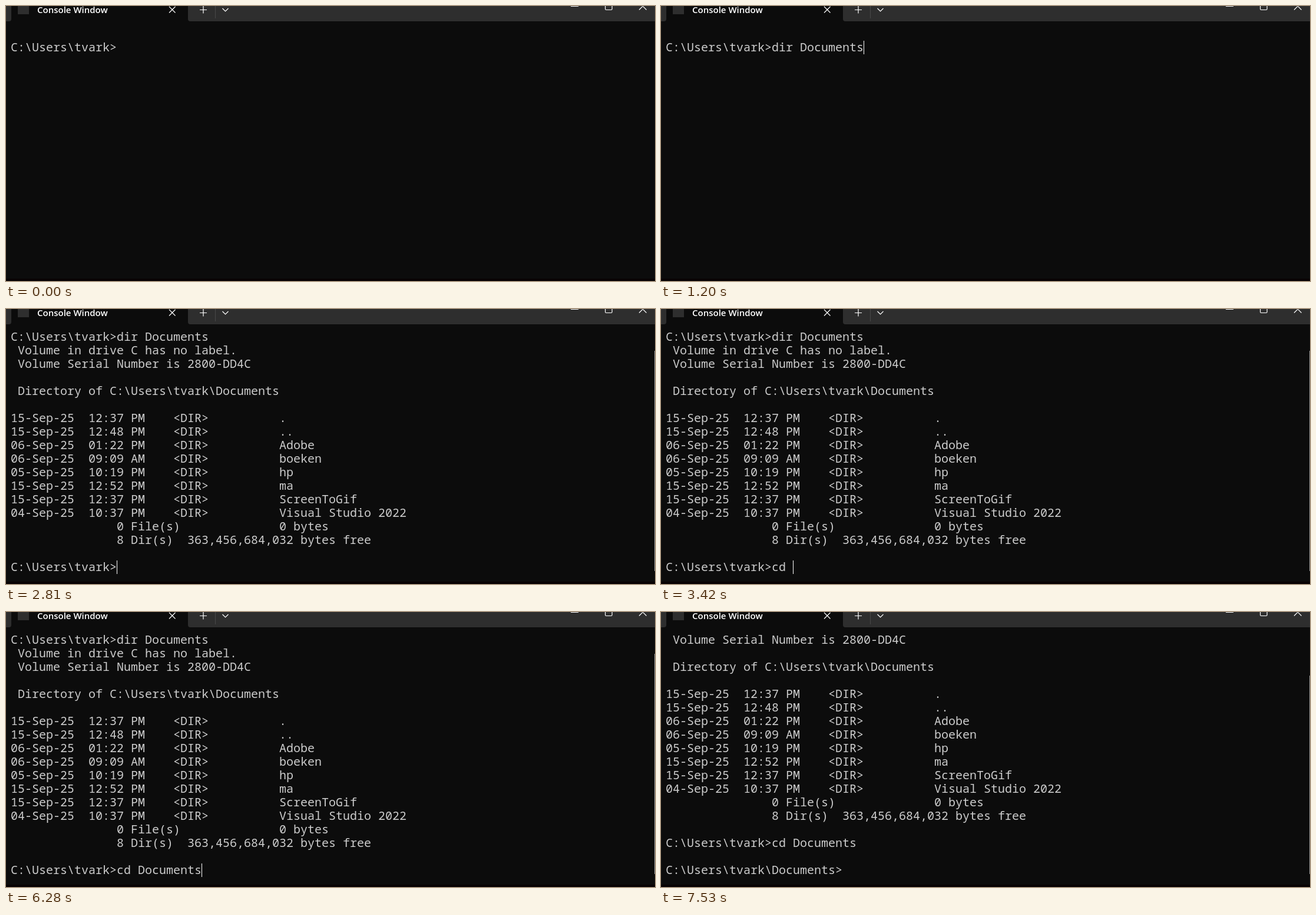
Write an HTML page that moves like this. It is 1102 px wide and 467 px high and loops after 8000 ms.

```html
<!DOCTYPE html>
<html lang="en">
<head>
<meta charset="utf-8">
<title>Console session</title>
<style>
  html, body { margin: 0; width: 100%; height: 100%; overflow: hidden; background: #0c0c0c; }
  #stage { position: relative; width: 1102px; height: 467px; overflow: hidden; background: #0c0c0c; }
  #stage > * { position: absolute; }
  #chrome { left: 0; top: 0; }
  #title {
    left: 53px; top: -4px; line-height: 20px; white-space: pre;
    font: 600 15px/20px "Open Sans", "Noto Sans", sans-serif; color: #fff;
  }
  #screen {
    left: 8px; top: 35px; margin: 0; color: #ccc;
    font: 20px/23px "Noto Sans Mono", "DejaVu Sans Mono", monospace;
    font-variant-ligatures: none;
  }
  #cursor { width: 1px; height: 23px; background: #fff; }
  #bar { left: 1101px; width: 1px; background: #9a9a9a; }
  #edge { left: 0; top: 463px; width: 1102px; height: 4px; background: #080304; }
</style>
</head>
<body>
<div id="stage">
  <svg id="chrome" width="1102" height="30" fill="none" stroke="#fff" stroke-width="1.2">
    <g fill="#2e2e2e" stroke="none">
      <path d="M0 0H9V22Q9 26 5 26H0Z"/>
      <path d="M309 0H1102V26H313Q309 26 309 22Z"/>
      <rect x="20" y="-5" width="19" height="19"/>
    </g>
    <path d="M355.5 0V21" stroke="#484848" stroke-width="1"/>
    <path d="M277 1L287.5 11.5M287.5 1L277 11.5"/>
    <path d="M329 6.5H341M335 0V12.5"/>
    <path d="M367.5 4L372.5 9L377.5 4"/>
    <path d="M959 .5H972" stroke-width="1"/>
    <rect x="1017.6" y="-5.5" width="11.5" height="12" rx="1.5"/>
    <path d="M1075 6.5L1087.5 -6M1087.5 6.5L1075 -6"/>
  </svg>
  <div id="title">Console Window</div>
  <pre id="screen"></pre>
  <div id="cursor"></div>
  <div id="bar"></div>
  <div id="edge"></div>
</div>
<script>
const LOOP = 8000, ROW = 23, COL = 12, LEFT = 8, TOP = 36;
const $ = id => document.getElementById(id);
const home = "C:\\Users\\tvark";
const prompt = home + ">";
const entry = (stamp, name) => stamp + "    <DIR>          " + name;

const listing = [
  prompt + "dir Documents",
  " Volume in drive C has no label.",
  " Volume Serial Number is 2800-DD4C",
  "",
  " Directory of " + home + "\\Documents",
  "",
  entry("15-Sep-25  12:37 PM", "."),
  entry("15-Sep-25  12:48 PM", ".."),
  entry("06-Sep-25  01:22 PM", "Adobe"),
  entry("06-Sep-25  09:09 AM", "boeken"),
  entry("05-Sep-25  10:19 PM", "hp"),
  entry("15-Sep-25  12:52 PM", "ma"),
  entry("15-Sep-25  12:37 PM", "ScreenToGif"),
  entry("04-Sep-25  10:37 PM", "Visual Studio 2022"),
  " ".repeat(15) + "0 File(s)" + " ".repeat(14) + "0 bytes",
  " ".repeat(15) + "8 Dir(s)  363,456,684,032 bytes free",
  ""
];

// Each page: lines above the prompt, the prompt, and the scrollbar top
const pages = [
  { above: [""], prompt, bar: 0 },
  { above: listing, prompt, bar: 0 },
  { above: listing, prompt, bar: 71 },
  { above: [...listing.slice(2), prompt + "cd Documents", ""], prompt: home + "\\Documents>", bar: 108 }
];

// Start time, page, typed text, cursor visible
const steps = [
  [0, 0, "", 0],
  [70, 0, "", 1],
  [140, 0, "d", 1],
  [270, 0, "di", 1],
  [410, 0, "dir", 1],
  [470, 0, "dir ", 1],
  [740, 0, "dir d", 1],
  [940, 0, "dir do", 1],
  [1200, 0, "dir Documents", 1],
  [1880, 1, "", 1],
  [1950, 2, "", 1],
  [2280, 2, "", 0],
  [2810, 2, "", 1],
  [3070, 2, "c", 1],
  [3210, 2, "cd", 1],
  [3420, 2, "cd ", 1],
  [4000, 2, "cd ", 0],
  [4070, 2, "cd d", 1],
  [4340, 2, "cd do", 1],
  [4540, 2, "cd doc", 1],
  [5070, 2, "cd Documents", 1],
  [5680, 2, "cd Documents", 0],
  [6280, 2, "cd Documents", 1],
  [6870, 3, "", 1],
  [7530, 3, "", 0]
];

const screen = $("screen"), cursor = $("cursor").style, bar = $("bar").style;
let shown;

function show([, index, typed, blink]) {
  const page = pages[index];
  const line = page.prompt + typed;
  screen.textContent = [...page.above, line].join("\n");
  cursor.left = LEFT + COL * line.length + "px";
  cursor.top = TOP + ROW * page.above.length + "px";
  cursor.visibility = blink ? "visible" : "hidden";
  bar.top = page.bar + "px";
  bar.height = (page.bar ? 445 - page.bar : 0) + "px";
}

const start = performance.now();
function tick() {
  const t = (performance.now() - start) % LOOP;
  const step = steps.findLast(s => s[0] <= t);
  if (step !== shown) show(shown = step);
  requestAnimationFrame(tick);
}
tick();
</script>
</body>
</html>
```
